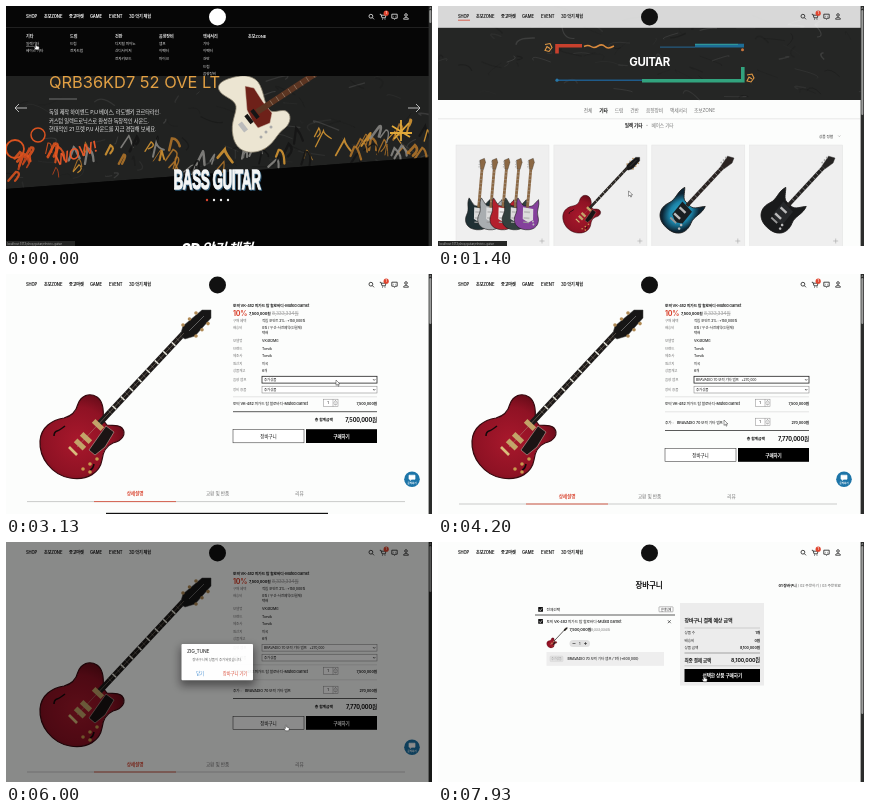
An HTML page that plays this animation: 426x240 px, repeating every 8 s.

```html
<!DOCTYPE html>
<html lang="ko">
<head>
<meta charset="utf-8">
<title>Guitar shop</title>
<style>
html, body { margin: 0; width: 100%; height: 100%; overflow: hidden; background: #fcfdfc; }
svg { display: block; width: 100vw; height: 100vh; }
text { font-family: Inter, "Noto Sans CJK KR", "Noto Sans CJK", sans-serif; letter-spacing: -.03em; white-space: pre; }
</style>
</head>
<body>
<svg id="stage" viewBox="0 0 426 240"></svg>
<script>
const LOOP = 8000;
const INK = '#151515', GREY = '#777', RED = '#d9442f';
const BRAND = '토빅', ITEM = BRAND + ' VK-482 피가드 탑 할로바디-Muted Garnet';
const AMP = 'BRAVADIO 70 모릭 기타 앰프';

let seed = 7;
const rnd = (a = 0, b = 1) => {
  seed = (seed * 16807) % 2147483647;
  return a + (b - a) * seed / 2147483647;
};

// Drawing helpers
const text = (x, y, size, str, fill = INK, weight = 400, anchor = 'start', extra = '') =>
  `<text x="${x}" y="${y}" font-size="${size}" fill="${fill}" font-weight="${weight}" text-anchor="${anchor}" ${extra}>${str}</text>`;
const rect = (x, y, w, h, fill, extra = '') =>
  `<rect x="${x}" y="${y}" width="${w}" height="${h}" fill="${fill}" ${extra}/>`;
const path = (d, fill = 'none', stroke = 'none', w = 1, extra = '') =>
  `<path d="${d}" fill="${fill}" stroke="${stroke}" stroke-width="${w}" ${extra}/>`;
const line = (x1, y1, x2, y2, stroke = '#ccc', w = .5) => path(`M${x1} ${y1}L${x2} ${y2}`, 'none', stroke, w);
const dot = (x, y, r, fill, extra = '') => `<circle cx="${x}" cy="${y}" r="${r}" fill="${fill}" ${extra}/>`;
const group = (inner, attrs = '') => `<g ${attrs}>${inner}</g>`;
const many = (n, fn) => Array.from({ length: n }, (_, i) => fn(i)).join('');

function header(ink) {
  const nav = [[20, 'SHOP'], [38, '초보ZONE'], [63, '중고마켓'], [84, 'GAME'], [103, 'EVENT'], [123, '3D 악기 체험']];
  return nav.map(([x, s]) => text(x, 12.3, 4.15, s, ink, 600)).join('') +
    dot(211.5, 11, 8.5, ink) +
    path('M366.8 10.2a1.9 1.9 0 1 1-3.8 0a1.9 1.9 0 1 1 3.8 0M366.3 11.6L368 13.3' +
      'M373.8 8.3H375L376 11.8H379.3L380 9.2H375.3M385.8 8.2H391.2V12.2H389L388.5 13.4L387.7 12.2H385.8Z' +
      'M401.3 9a1.3 1.3 0 1 1-2.6 0a1.3 1.3 0 1 1 2.6 0M397.6 13.2C397.8 10.7 402.2 10.7 402.4 13.2Z', 'none', ink, .75) +
    dot(376.5, 13.1, .5, ink) + dot(379, 13.1, .5, ink) + dot(387.5, 10.2, .35, ink) + dot(389.5, 10.2, .35, ink) +
    dot(380.2, 7.2, 2.6, '#e0452f') + text(380.2, 8.4, 3.2, '1', '#fff', 600, 'middle');
}

const scrollbar = (y, h) => rect(422.6, 0, 3.4, 240, '#2b2c2b') + rect(423.3, y, 2, h, '#9b9c9b', 'rx="1"') +
  path('M423.2 2.4L424.3 .9L425.4 2.4Z', '#aaa');
const status = w => rect(0, 235, w, 5, '#252625') +
  text(1, 238.6, 3, 'localhost:5173/shop/guitar/electric-guitar', '#a5a5a5');
const grunge = (x, y, w, h, n) => many(n, () => {
  const px = x + rnd(0, w), py = y + rnd(0, h);
  return path(`M${px} ${py}q${rnd(-12, 12)} ${rnd(-9, 3)} ${rnd(-25, 25)} ${rnd(-14, 8)}`, 'none',
    rnd() > .5 ? '#666' : '#111', rnd(.3, 1.6), `opacity="${rnd(.12, .4)}"`);
});

// Guitars
function redGuitar() {
  const frets = many(17, i => {
    const k = i / 17, x = 104 + 72 * k, y = 138 - 77 * k;
    return line(x - 1.9, y - 1.8, x + 1.9, y + 1.8, i % 2 ? '#e9e9e0' : '#8a837c', i % 2 ? 1.5 : .5);
  });
  const bar = (x, y) => rect(-6, -2.6, 12, 5.2, '#c3a468', `transform="translate(${x} ${y}) rotate(43)"`);
  const body = 'M97 146C98 136 97 127 91 123C83 118 75 122 72 130C70 138 66 142 58 144C46 146 35 153 34 167' +
    'C33 184 46 201 64 204C82 207 94 198 96 186C97 177 100 172 107 169C116 167 121 160 116 154C112 150 106 152 101 151Z';
  return path(body, 'url(#cherry)', '#35090f', 1.2) +
    path('M59 152q-5 4 -8 5t-3 5M88 190q-1 5 -4 6', 'none', '#16080a', 1.6) +
    path('M100 152L108 158L99 173L89 181L83 176Z', '#1b1414', '#cfc6b4', .5) +
    line(91, 152, 177, 60, '#1d1a19', 5.8) + frets +
    path('M174 62L177 52L196 36L205 36L205 44L189 62L179 65Z', '#171616', '#444', .5) +
    many(3, i => dot(177 + i * 6.5, 51 - i * 6, 1.8, '#b08a55') + dot(190 + i * 6, 62 - i * 6.2, 1.8, '#b08a55')) +
    line(183, 57, 198, 42, '#aaa', .5) +
    bar(92, 151) + bar(80, 164) + bar(74, 170.5) +
    line(63, 173, 71, 181, '#d9bd7c', 2.6) + line(71, 173, 178, 59, '#b5a58f', .4) +
    [[84, 190], [91, 185], [77, 195], [84, 198]].map(p => dot(...p, 1.8, '#c79a4e')).join('');
}

function axe(x, y, turn, k, col, guard, neck) {
  const body = 'M0 20C-14 20 -19 10 -15 0C-12 -7 -17 -14 -14 -22C-10 -18 -8 -12 -3 -12L3 -12' +
    'C8 -12 10 -18 14 -22C17 -14 12 -7 15 0C19 10 14 20 0 20Z';
  return group(path(body, col, '#1b1b1b', .8) + path('M-6 -10L8 -9L9 6L3 10L-5 6Z', guard) +
    rect(-1.9, -62, 3.8, 52, neck) + many(9, i => line(-1.9, -58 + i * 5, 1.9, -58 + i * 5, '#bbb', .5)) +
    path('M-2 -62L-4 -74L2 -77L4 -72L2 -62Z', neck, '#222', .4) +
    many(3, i => dot(-4.3, -65 - 3.4 * i, .9, '#aaa')) +
    rect(-4, -5, 8, 2.4, '#bcbcbc') + rect(-4, 3, 8, 2.4, '#bcbcbc') + rect(-4, 9, 8, 1.8, '#999') +
    dot(9, 8, 1.3, '#bbb') + dot(10, 12, 1.3, '#bbb'),
    `transform="translate(${x} ${y}) rotate(${turn}) scale(${k})"`);
}

function bass() {
  const bar = (x, y, h, col) => rect(-5, -h / 2, 10, h, col, `transform="translate(${x} ${y}) rotate(52)"`);
  return path('M234 70C222 72 210 76 213 84C216 91 228 92 230 100C231 107 224 116 227 130C230 146 244 149 256 144' +
      'C268 139 270 128 279 122C285 117 286 108 280 105C274 103 268 108 263 104C258 98 258 84 252 76C248 71 240 69 234 70Z', '#ece5d2', '#8e8673', .8) +
    path('M239 80L248 82L257 96L266 107L264 117L252 122L246 114L241 104Z', '#6e2119', '#d8cdb8', .5) +
    line(251, 106, 318, 62, '#5b3522', 6) +
    many(8, i => line(264 + i * 6, 94.5 - i * 3.9, 267 + i * 6, 99 - i * 3.9, '#b9a48e', .5)) +
    bar(249, 108, 4, '#151515') + bar(243, 113, 4, '#151515') + bar(237, 121, 5, '#bbb') +
    dot(255, 131, 1.5, '#aaa') + dot(260, 126, 1.5, '#aaa') + dot(265, 121, 1.5, '#aaa');
}

// Scenes
function graffiti() {
  const tags = many(75, () => {
    const x = rnd(0, 426), y = rnd(146, 176) - x * .05;
    const tone = x < 60 ? ['#e2551f', '#c9471d'] : ['#dc9a33', '#b5772a', '#8b8a86', '#141414'];
    return path(`M${x} ${y}l${rnd(2, 9)} ${rnd(-16, -6)}q${rnd(0, 7)} ${rnd(-3, 6)} ${rnd(-3, 8)} ${rnd(6, 14)}`, 'none',
      tone[Math.floor(rnd(0, tone.length))], rnd(.9, 2.8), 'stroke-linecap="round" opacity=".85"');
  });
  const rings = dot(32, 129, 7, 'none', 'stroke="#d9521f" stroke-width="1.5"') + dot(9, 143, 9, 'none', 'stroke="#d9521f" stroke-width="1.8"');
  const star = path('M386 120L404 131M403 117L388 133M384 127H406M395 114V135', 'none', '#e0a93a', 1.8);
  return tags + rings + star +
    text(51, 160, 15, 'WOW!', '#e8582a', 500, 'start', 'transform="rotate(-20 51 160)" font-style="italic"');
}

function home() {
  const wall = group(path('M0 60H426V151L0 183Z', '#212221') + grunge(0, 70, 426, 110, 90) + graffiti(), 'clip-path="url(#wall)"');
  const menu = [
    [20, '기타', '일렉기타', '베이스 기타'], [64, '드럼', '드럼', '전자드럼'],
    [109, '건반', '디지털 피아노', '신디사이저', '전자키보드'], [153, '음향장비', '앰프', '이펙터', '마이크'],
    [197, '액세서리', '기타', '이펙터', '건반', '드럼', '음향장비'], [242, '초보ZONE']
  ].map(([x, head, ...subs]) => text(x, 31.7, 4.1, head, '#eee', 600) +
    subs.map((s, i) => text(x, 38.8 + i * 7.6, 3.7, s, '#e0e0e0', 500)).join('')).join('');
  const copy = ['독일 제작 하이엔드 P/J 베이스, 라도벨키 코르타라인.', '커스텀 일렉트로닉스로 완성한 독창적인 사운드.',
    '현대적인 21 프렛 P/J 사운드를 지금 경험해 보세요.'];
  const arrow = 'M21 102H9M13 98L9 102L13 106';
  const big = (dx, fill) => text(0, 0, 28.5, 'BASS GUITAR', fill, 800, 'middle',
    `transform="translate(${211 + dx} ${183 + dx}) scale(.47 1)" stroke="${fill}" stroke-width="1.4" style="font-family:'Liberation Sans',sans-serif"`);
  return rect(0, 0, 426, 240, '#050505') + wall + bass() +
    text(43, 82.3, 16.4, 'QRB36KD7 52 OVE LT', '#e2a044', 400, 'start', 'style="letter-spacing:0"') + line(43, 93, 71, 93, '#aaa', .6) +
    copy.map((s, i) => text(43, 108 + i * 8.6, 5.25, s, '#eee')).join('') +
    path(arrow, 'none', '#ddd', .8) + group(path(arrow, 'none', '#ddd', .8), 'transform="matrix(-1 0 0 1 423 0)"') +
    big(1, '#2e5874') + big(0, '#f4f6f6') +
    many(4, i => dot(201 + i * 7, 194, 1.2, i ? '#eee' : RED)) +
    text(211, 247, 13.6, '3D 악기 체험', '#fff', 900, 'middle', 'font-style="italic"') +
    rect(0, 0, 426, 70, '#060606') + line(0, 21.5, 426, 21.5, '#3a3a3a') + header('#fff') + menu +
    line(20, 40.4, 33, 40.4, '#ddd', .4) + scrollbar(4, 13) + status(69);
}

const shopMark = line(20, 14.2, 32, 14.2, RED, .8);

function list() {
  const tabs = [[150, '전체'], [165.5, '기타'], [181, '드럼'], [196.5, '건반'], [216.5, '음향장비'], [240.5, '액세서리'], [266.5, '초보ZONE']];
  const scribble = (x, y) => path(`M${x - 3} ${y - 3}l5 -1l2 4l-3 4l-4 -1l2 -4l3 2`, 'none', '#e39a45', 1.1);
  const colours = ['#1f3034', '#a9adb0', '#b3202c', '#33413f', '#84419b'];
  return rect(0, 0, 426, 240, '#fcfdfc') + rect(0, 0, 426, 94, '#252625') + grunge(0, 8, 426, 84, 75) +
    rect(0, 0, 426, 21.8, '#fff', 'opacity=".82"') + header('#111') + shopMark +
    path('M119 47.5V39.7H144', 'none', '#c7402d', 3.6) +
    path('M146 40.5q4 -2 7 0t7 -.5t7 .5t9 -.5', 'none', '#d98a3d', 1.5) +
    path('M222 41.2H257', 'none', '#245a80', 1.2) + path('M257 39.6H306', 'none', '#1d6d96', 3.6) + line(257, 38.4, 300, 38.4, '#35a198', .9) +
    dot(304.5, 43.8, 1.5, '#c9743d') +
    path('M119 74.2H204', 'none', '#1f5b8a', 1.4) + dot(119, 74.2, 1.6, '#2877a8') +
    path('M204 74.7H304.8V61', 'none', '#32a37e', 3.6) +
    scribble(110, 41.5) + scribble(312, 72) +
    text(211.5, 60.2, 11.4, 'GUITAR', '#fff', 700, 'middle') +
    tabs.map(([x, s], i) => text(x, 105.7, 4.8, s, i === 1 ? INK : GREY, i === 1 ? 700 : 400, 'middle')).join('') +
    line(0, 112.8, 422, 112.8, '#d5d5d5') +
    text(195.5, 121, 4.7, '일렉 기타', INK, 700, 'middle') + dot(209, 119.3, .6, '#999') +
    text(224.5, 121, 4.7, '베이스 기타', GREY, 400, 'middle') +
    text(395, 131.5, 3.7, '상품 정렬', '#333', 500, 'end') + path('M400.2 129.5l1.1 1.2l1.1 -1.2', 'none', '#777', .4) +
    many(4, i => {
      const x = 18 + i * 97.9;
      return rect(x, 139, 93, 103, '#efefef', 'stroke="#e2e2e2" stroke-width=".5"') +
        path(`M${x + 83.5} 235h5M${x + 86} 232.5v5`, 'none', '#999', .5);
    }) +
    colours.map((c, i) => axe(40 + i * 12.2, 209, 5, .74, c, i === 2 ? '#eee' : '#dcdcdc', '#8b6844')).join('') +
    group(redGuitar(), 'transform="translate(109.5 135) scale(.45)"') +
    axe(242, 207, 43, 1, 'url(#ocean)', '#191f22', '#2b2422') + axe(343, 207, 43, 1, '#191a1b', '#26282a', '#252322') +
    scrollbar(4, 105) + status(69);
}

const counter = y => rect(317.5, y, 14.5, 7.5, '#fff', 'stroke="#888" stroke-width=".5"') +
  text(322, y + 5.1, 3.8, '1', INK, 400, 'middle') + line(327, y, 327, y + 7.5, '#888') +
  line(327, y + 3.75, 332, y + 3.75, '#888') + path(`M328.6 ${y + 2.4}l.9 -1l.9 1M328.6 ${y + 5}l.9 1l.9 -1`, 'none', INK, .5);

const select = (y, label, id = '') => rect(256, y, 115, 6.8, '#fff', `stroke="#777" stroke-width=".5" ${id}`) +
  text(258, y + 4.7, 3.5, label) + path(`M367 ${y + 2.8}l1.2 1.3l1.2 -1.3`, 'none', INK, .6);

function order(added) {
  const down = added ? 18.8 : 0, tab = added ? 2.4 : 0;
  const total = added ? '7,770,000원' : '7,500,000원';
  return select(102.3, added ? AMP + '   +270,000' : '추가상품', `class="pick"`) +
    text(227, 131, 3.75, ITEM, INK, 500) + counter(125.2) + text(371, 131, 3.7, '7,500,000원', INK, 600, 'end') +
    (added ? line(227, 137.8, 371, 137.8, '#ccc') + text(227, 149.7, 3.75, '추가 :') + text(239, 149.7, 3.75, AMP, INK, 500) +
      counter(144.2) + text(371, 149.7, 3.7, '270,000원', INK, 600, 'end') : '') +
    line(227, 137.7 + down, 371, 137.7 + down, INK, .7) +
    text(327, 147.4 + down, 3.9, '총 합계금액', INK, 600, 'end') +
    text(371, 147.8 + down, 5.6, total, INK, 700, 'end') +
    rect(227, 155.5 + down, 71, 13.3, '#fff', 'stroke="#222" stroke-width=".5"') + rect(300, 155.2 + down, 71, 13.8, '#000') +
    text(262.5, 163.9 + down, 4.6, '장바구니', INK, 500, 'middle') + text(335.5, 163.9 + down, 4.6, '구매하기', '#fff', 600, 'middle') +
    group(text(129, 221.2, 4.7, '상세설명', RED, 600, 'middle') + text(211.5, 221.2, 4.7, '교환 및 반품', GREY, 400, 'middle') +
      text(293.5, 221.2, 4.7, '리뷰', GREY, 400, 'middle') + line(21, 227.6, 399, 227.6, '#aaa', .6) + line(88, 227.6, 170, 227.6, RED, .8) +
      rect(100, 238.8, 222, 4, '#111'), `transform="translate(0 ${tab})"`);
}

function detail() {
  const rows = [[48, '구매 혜택', '적립 포인트 2% : +150,000원'], [55.3, '배송비', '0원 / 우선-사전예약(선결제)'], [60.3, '', '택배'],
    [68.3, '모델명', 'VK482MG'], [75.6, '브랜드', 'Torvik'], [83, '제조사', 'Torvik'], [90.5, '원산지', '미국'],
    [98, '상품재고', '6개'], [107, '음향 앰프', ''], [117, '장비 용품', '']];
  return rect(0, 0, 426, 240, '#fcfdfc') + header('#111') + redGuitar() +
    text(227, 33.3, 3.8, ITEM, INK, 600) +
    text(227, 42.2, 7, '10%', RED, 700) + text(243, 41.2, 3.8, '7,500,000원', INK, 700) +
    text(266, 41.2, 4.9, '8,333,334원', '#999', 400, 'start', 'text-decoration="line-through"') +
    rows.map(([y, k, v]) => text(227, y, 3.5, k, GREY) + text(256, y, 3.5, v, '#222', 500)).join('') +
    select(112.2, '추가상품') + line(227, 122.8, 371, 122.8, '#ccc') +
    group(order(false), 'id="plain"') + group(order(true), 'id="added"') +
    dot(406, 205.3, 7.8, '#1d75a8') + path('M403 201.2h6v4h-3.4l-1.2 1.3v-1.3H403Z', '#fff', '#fff', .7) +
    text(406, 210, 2.5, '문의하기', '#fff', 600, 'middle') +
    group(shopMark + status(72), 'id="trail"') + scrollbar(4, 46);
}

const dialog = () => rect(0, 0, 426, 240, '#000', 'opacity=".5"') +
  rect(174, 105, 75, 39, '#000', 'rx="2" opacity=".5" filter="url(#soft)"') + rect(175.5, 102, 71.5, 36.2, '#fff', 'rx="1"') +
  text(181, 110.5, 4.9, 'ZIG_TUNE', '#222', 500) + text(211, 119.3, 3.5, '장바구니에 상품이 추가되었습니다.', '#555', 400, 'middle') +
  text(194, 132.8, 4.3, '닫기', '#2479c9', 500, 'middle') + text(229, 132.8, 4.4, '장바구니 가기', RED, 500, 'middle');

function cart() {
  const check = y => rect(100.2, y, 4.8, 4.8, '#111', 'rx=".5"') + path(`M101.2 ${y + 2.4}l1.1 1.2l1.8 -2.3`, 'none', '#fff', .7);
  const sums = [[92.4, '상품 수', '1개'], [99.6, '배송비', '0원'], [106.8, '상품 금액', '8,100,000원']];
  return rect(0, 0, 426, 240, '#fcfdfc') + header('#111') + text(211, 45.8, 7.6, '장바구니', INK, 700, 'middle') +
    text(403, 44.5, 3.8, '<tspan font-weight="700" fill="#151515">01 장바구니</tspan> / 02 주문하기 / 03 주문완료', '#666', 400, 'end') +
    check(65) + text(108.5, 68.8, 3.8, '전체선택', INK, 500) +
    rect(221, 64.8, 14, 5, '#fff', 'stroke="#777" stroke-width=".5" rx=".5"') + text(228, 68.5, 2.9, '선택삭제', INK, 500, 'middle') +
    line(97, 73, 237, 73, INK, .7) + check(77) + text(108.5, 81, 3.75, ITEM, INK, 500) +
    path('M229.8 78.2l3 3m0 -3l-3 3', 'none', INK, .6) +
    group(redGuitar(), 'transform="translate(104.5 81) scale(.122)"') +
    text(131.5, 89, 3.9, '7,500,000원', INK, 600) + text(153, 89, 3.5, '8,333,334원', '#999', 400, 'start', 'text-decoration="line-through"') +
    rect(131.5, 98, 20.5, 7, '#e1e1e1', 'rx="3.5"') + text(141.7, 102.8, 3.6, '1', INK, 400, 'middle') +
    path('M134.5 101.5h3M146 101.5h3M147.5 100v3', 'none', '#222', .6) +
    rect(108.5, 110, 117.5, 13.8, '#eeeeee') + rect(112, 114, 13, 5.6, '#e2e2e2', 'stroke="#ccc" stroke-width=".4" rx="1"') +
    text(118.5, 118, 2.9, '추가상품', '#999', 400, 'middle') + text(129.5, 118.3, 3.6, AMP + ' / 1개 (+600,000)', '#222', 500) +
    rect(242, 61, 84, 82.5, '#ececec') + text(246.5, 80, 5, '장바구니 결제 예상 금액', INK, 600) +
    line(246.5, 86, 322, 86, '#aaa') +
    sums.map(([y, k, v]) => text(246.5, y, 3.6, k, '#222', 500) + text(322, y, 3.7, v, INK, 600, 'end')).join('') +
    line(246.5, 111, 322, 111, '#555') + text(246.5, 119.8, 4.6, '최종 결제 금액', INK, 600) +
    text(322, 119.8, 5.2, '8,100,000원', INK, 700, 'end') +
    line(246.5, 123.8, 322, 123.8, '#aaa') + rect(246.5, 127, 75.5, 13, '#000') +
    text(284.3, 135.2, 4.7, '선택한 상품 구매하기', '#fff', 600, 'middle') + scrollbar(4, 168);
}

const stage = document.getElementById('stage');
const scenes = { home, list, detail, cart };
stage.innerHTML = `<defs>
  <radialGradient id="cherry" cx=".45" cy=".55" r=".62"><stop offset="0" stop-color="#a8182c"/><stop offset=".65" stop-color="#8f1224"/><stop offset="1" stop-color="#5e0a16"/></radialGradient>
  <radialGradient id="ocean"><stop offset="0" stop-color="#35b4d2"/><stop offset=".6" stop-color="#1c83a8"/><stop offset="1" stop-color="#0d2433"/></radialGradient>
  <filter id="soft" x="-30%" y="-50%" width="160%" height="200%"><feGaussianBlur stdDeviation="4"/></filter>
  <clipPath id="wall"><path d="M0 60H426V151L0 183Z"/></clipPath></defs>` +
  Object.entries(scenes).map(([id, draw]) => group(draw(), `id="${id}"`)).join('') +
  group(dialog(), 'id="dialog"') +
  group(path('M0 0V5.4L1.3 4.2L2.2 6.2L3 5.8L2.2 4H4Z', '#fff', '#222', .45), 'id="arrow"') +
  group(path('M-.6 .4Q0 -.6 .6 .4V2.1L2.9 2.7Q3.4 3 3.2 4L2.7 5.8H-.5L-2 3.6Q-1.8 2.8 -.6 3.6Z', '#fff', '#222', .45), 'id="hand"');
const el = id => document.getElementById(id);
const show = (id, on) => el(id).setAttribute('display', on ? 'inline' : 'none');

const CUTS = [[6700, 'cart'], [1770, 'detail'], [330, 'list'], [0, 'home']];
const TRACK = [[0, 30, 38], [270, 30, 38], [730, 238, 164], [900, 238, 164], [1600, 179, 190], [2200, 179, 190],
  [2950, 330, 106], [3250, 330, 106], [3550, 312, 114], [4200, 286, 146], [4500, 286, 146], [5500, 280, 183],
  [6130, 280, 183], [6580, 229, 131], [6900, 229, 131], [7500, 142, 100], [7800, 142, 100], [7930, 266, 134], [LOOP, 266, 134]];
const clamp = v => Math.max(0, Math.min(1, v));

function pointer(t) {
  const i = TRACK.findIndex(p => p[0] > t);
  const [a, x, y] = TRACK[i - 1], [b, u, v] = TRACK[i];
  const k = (t - a) / (b - a), e = k * k * (3 - 2 * k);
  return [x + (u - x) * e, y + (v - y) * e];
}

function render(t) {
  const scene = CUTS.find(c => t >= c[0])[1];
  Object.keys(scenes).forEach(id => show(id, id === scene));
  show('trail', t < 2600);
  const added = t >= 3560, focus = t >= 3000 && t < 5650;
  show('plain', !added);
  show('added', added);
  document.querySelectorAll('.pick').forEach(box => {
    box.setAttribute('stroke', focus ? '#222' : '#777');
    box.setAttribute('stroke-width', focus ? .8 : .5);
  });
  show('dialog', t >= 5930 && t < 6700);
  el('dialog').setAttribute('opacity', clamp((t - 5890) / 122));
  const hand = t < 1000 || t >= 5000, [x, y] = pointer(t);
  show('hand', hand);
  show('arrow', !hand);
  el(hand ? 'hand' : 'arrow').setAttribute('transform', `translate(${x} ${y})`);
}

const start = performance.now();
function tick() {
  render((performance.now() - start) % LOOP);
  requestAnimationFrame(tick);
}
tick();
</script>
</body>
</html>
```
